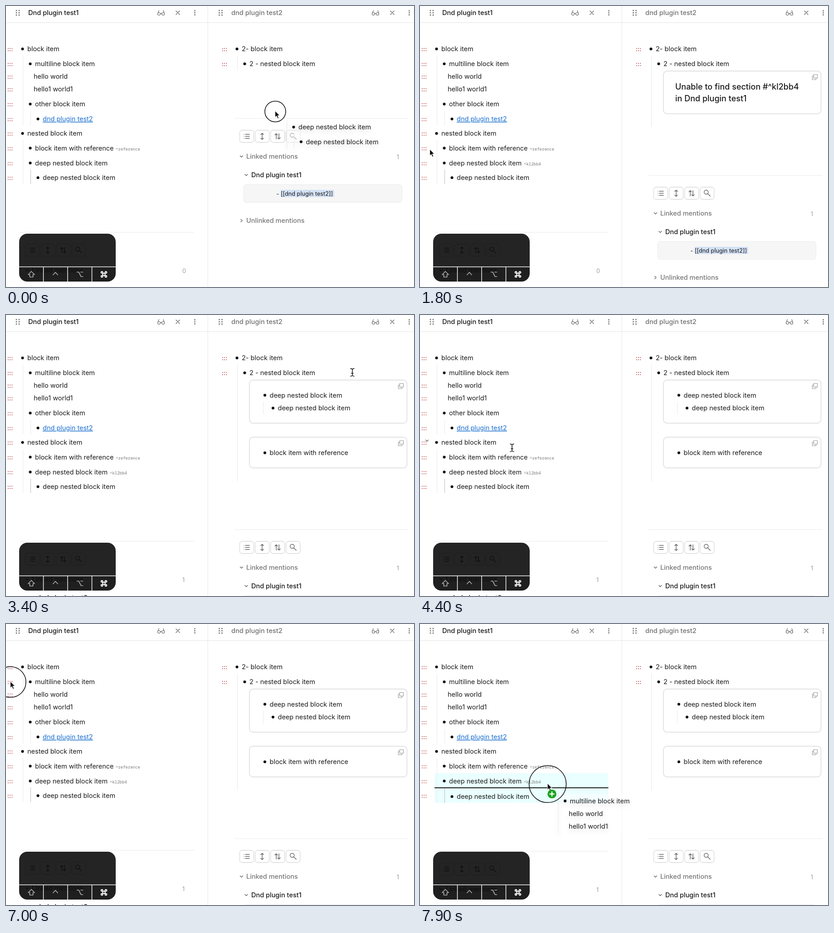
These frames come from a looping animation (900x622 px, 8 s). An HTML page:

```html
<!DOCTYPE html>
<html lang="en">
<head>
<meta charset="utf-8">
<title>Block drag and drop</title>
<style>
html, body { margin: 0; width: 100%; height: 100%; overflow: hidden; background: #fff; }
svg { display: block; width: 100%; height: 100%; }
text { font: 14.5px Inter, sans-serif; fill: #1a1a1a; white-space: pre; }
.title { font-size: 14.6px; font-weight: 500; }
.bold { font-weight: 500; }
.muted { font-weight: 500; fill: #777; }
.link { fill: #1a6fd0; text-decoration: underline; }
.count { font-size: 12.5px; fill: #999; }
.small { font-size: 12.7px; }
.error { font-size: 18px; font-weight: 500; }
.ref { font: 9px "Noto Sans Mono", monospace; fill: #777; }
.icon { fill: none; stroke: #666; stroke-width: 1.4; stroke-linecap: round; stroke-linejoin: round; }
.lift { filter: drop-shadow(0 5px 6px rgba(0, 0, 0, .16)); }
</style>
</head>
<body>
<svg id="stage" viewBox="0 0 900 622"></svg>
<script>
const LOOP = 8000, STEP = 100;

// time, x, y of the pointer
const PATH = [
  [0, 594, 233], [200, 648, 176], [400, 700, 126], [500, 712, 120], [700, 714, 122], [900, 716, 131],
  [1000, 716, 131], [1100, 690, 150], [1300, 460, 255], [1500, 160, 315], [1600, 70, 322], [1800, 22, 318],
  [2000, 9, 316], [2200, 10, 316], [2300, 60, 300], [2500, 400, 215], [2700, 650, 176], [2800, 735, 138],
  [2900, 767, 130], [3000, 767, 125], [3300, 764, 127], [3600, 764, 127], [3700, 650, 150], [3800, 420, 225],
  [3900, 250, 282], [4000, 203, 293], [4300, 203, 293], [4400, 203, 294], [6000, 203, 294],
  [6400, 80, 190], [6700, 12, 132], [6800, 10, 128], [7100, 10, 128], [7200, 13, 134], [7300, 249, 334], [8000, 287, 357]
];
// time, radius of the press ring
const RING = [
  [0, 23], [100, 41], [600, 41], [700, 23], [800, 0], [1900, 0], [2000, 18], [2100, 34], [2200, 41],
  [3100, 41], [3200, 23], [3300, 0], [6800, 0], [6900, 18], [7000, 34], [7100, 34], [7200, 41], [8000, 41]
];
// time, offset of the dragged text from the pointer
const LAG = [[0, 51, 35], [600, 49, 38], [2700, 42, 38], [2900, 24, 38], [3100, 49, 38], [7300, 45, 35], [7900, 49, 38]];

const DROPS = [
  { from: 300, to: 700, x: 504, top: 111, line: 144, bottom: 143 },
  { from: 2800, to: 3200, x: 504, top: 111, line: 270, bottom: 269 },
  { from: 7300, to: 7600, x: 32, top: 297, line: 330, bottom: 329 },
  { from: 7600, to: 8000, x: 32, top: 330, line: 362.5, bottom: 396 }
];

const ROWS = [
  [47, 95, 'block item'], [64, 128, 'multiline block item'], [61, 156, 'hello world'],
  [61, 184, 'hello1 world1'], [64, 217, 'other block item'], [81, 250, 'dnd plugin test2'],
  [47, 282, 'nested block item'], [64, 314.5, 'block item with reference'],
  [64, 347.5, 'deep nested block item'], [81, 380, 'deep nested block item']
];

const within = (t, a, b) => t >= a && t < b;

function sample(keys, t) {
  const i = keys.findIndex(k => k[0] > t);
  if (i < 0) return keys[keys.length - 1].slice(1);
  if (i === 0) return keys[0].slice(1);
  const a = keys[i - 1], b = keys[i], p = (t - a[0]) / (b[0] - a[0]);
  return a.slice(1).map((v, j) => v + (b[j + 1] - v) * p);
}

const text = (x, y, s, cls = '') => `<text x="${x}" y="${y + 5.2}" class="${cls}">${s}</text>`;
const dot = (x, y, r, fill = '#111') => `<circle cx="${x}" cy="${y}" r="${r}" fill="${fill}"/>`;
const rect = (x, y, w, h, attrs) => `<rect x="${x}" y="${y}" width="${w}" height="${h}" ${attrs}/>`;
const icon = (x, y, d, attrs = '') => `<path class="icon" transform="translate(${x} ${y})" d="${d}" ${attrs}/>`;
const guide = (x, y1, y2, color = '#e9e9e9') => rect(x - .5, y1, 1, y2 - y1, `fill="${color}"`);
const item = (x, y, s, cls) => dot(x - 10.5, y, 3.1) + text(x, y, s, cls);
const dots = (xs, ys, r, fill) => xs.map(x => ys.map(y => dot(x, y, r, fill)).join('')).join('');
const handle = (x, y) => dots([x - 4.2, x, x + 4.2], [y - 2, y + 3], .95, '#b8383a');
const chevron = (x, y, right) => icon(x, y, right ? 'M-1.5-3L1.5 0L-1.5 3' : 'M-3-1.5L0 1.5L3-1.5');

function header(x, title, fill) {
  return dots([x + 23, x + 29], [10, 15, 20], 1.6, '#777')
    + `<text x="${x + (x ? 24 : 49)}" y="20.4" class="title" style="fill:${fill}">${title}</text>`;
}

function headerIcons(x) {
  return icon(x + 342, 15, 'M-7.5 2.5a3 3 0 1 0 6 0a3 3 0 1 0-6 0M1.5 2.5a3 3 0 1 0 6 0a3 3 0 1 0-6 0M-1.5 2Q0 .8 1.5 2M-7.5 2L-4.5-5M7.5 2L5-5',
      'style="stroke-width:1.2"')
    + icon(x + 379, 15, 'M-4-4L4 4M4-4L-4 4')
    + dots([x + 416.5], [10.5, 15, 19.5], 1.5, '#777');
}

const TOOLS = [
  'M-6-4.5h0M-6 0h0M-6 4.5h0M-3-4.5H6M-3 0H6M-3 4.5H6',
  'M0-7V7M-3.2-4L0-7L3.2-4M-3.2 4L0 7L3.2 4',
  'M-3 6V-6M-6-3L-3-6L0-3M3-6V6M0 3L3 6L6 3',
  'M-6.5-2.5a4.5 4.5 0 1 0 9 0a4.5 4.5 0 1 0-9 0M1.5 1L7 6.5'
];

function mentions(x, y, count, child) {
  let out = rect(x, y - .5, 384, 1, 'fill="#e9e9e9"');
  TOOLS.forEach((d, i) => {
    const left = x + 11.5 + i * 34.1;
    out += rect(left, y + 26, 31, 27, 'rx="5.5" fill="#fff" stroke="#d9d9d9" stroke-width="1.3"')
      + icon(left + 15.5, y + 39.5, d);
  });
  out += chevron(x + 15.5, y + 84) + text(x + 26, y + 84, 'Linked mentions', 'muted')
    + text(x + 358, y + 84.5, count, 'count');
  if (child) {
    out += chevron(x + 26, y + 125) + text(x + 37, y + 125, child, 'bold')
      + rect(x + 20, y + 146, 349.5, 40, 'rx="6" fill="#f6f6f6" stroke="#ececec"')
      + rect(x + 102, y + 158, 118, 16, 'fill="#d3e1f5"')
      + text(x + 92.5, y + 165.5, '- [[dnd plugin test2]]', 'small')
      + chevron(x + 15.5, y + 226, true) + text(x + 26, y + 226, 'Unlinked mentions', 'muted');
  }
  return out;
}

function embed(y, h, content) {
  return rect(537, y, 347.5, h, 'rx="8" fill="none" stroke="#e2e2e2" stroke-width="1.8"')
    + icon(871, y + 13.5, 'M-2.5-6H5.5V2H-2.5ZM-2.5-2.5H-5.5V5.5H2.5V2', 'style="stroke:#999;stroke-width:1.2"') + content;
}

function leftPane(t, drop) {
  const line = drop && drop.x < 400 ? drop.line : Infinity;
  const down = y => y > line ? 2 : 0;
  let out = guide(37.5, 110, 264) + guide(54.5, 233, 264)
    + guide(37.5, 297, 394 + down(390)) + guide(54.5, 362 + down(370), 394 + down(390), '#bdbdbd');
  ROWS.forEach(([x, y, s], i) => {
    const draw = x === 61 ? text : item;
    out += handle(9, y + 1) + draw(x, y + down(y), s, i === 5 ? 'link' : '');
  });
  out += text(242, 315, '^reference', 'ref');
  if (t >= 800) out += text(229, 348 + down(348), '^kl2bb4', 'ref');
  if (within(t, 3900, 6100)) out += chevron(15.5, 278);
  const linked = t >= 2000;
  return out + mentions(31, 501 + down(501), linked ? '1' : '0', linked && 'dnd plugin test2');
}

function rightPane(t, drop) {
  const found = t >= 2000, second = t >= 3200;
  let bottom = 143, base = 249, out = '';
  if (t >= 800) {
    bottom = 267;
    base = found ? 376 : 375;
    out += embed(144, found ? 95.5 : 94.5, found
      ? guide(567.5, 192, 220) + item(581.5, 177.5, 'deep nested block item') + item(599.5, 206, 'deep nested block item')
      : text(563, 179.5, 'Unable to find section #^kl2bb4', 'error') + text(563, 205.5, 'in Dnd plugin test1', 'error'));
  }
  if (second) {
    bottom = 368;
    base = 475;
    out += embed(270.5, 68, item(581.5, 305, 'block item with reference'));
  }
  if (drop && drop.x > 400) base += 2;
  return guide(510.5, 110, bottom) + handle(482, 96) + handle(482, 129)
    + item(520, 95, '2- block item') + item(537, 128, '2 - nested block item')
    + out + mentions(504, base, '1', 'Dnd plugin test1');
}

const dropMark = d => rect(d.x, d.top, 383.5, d.bottom - d.top, 'fill="#eaffff"');
const dropLine = d => rect(d.x, d.line - 1, 383.5, 2, 'fill="#111"');

function ghost(t, x, y) {
  let body, h, w = 206;
  if (t < 600) {
    h = 64;
    body = guide(-25.5, -16, 48) + guide(-9.5, 16, 48)
      + item(0, 0, 'deep nested block item') + item(16.5, 32.5, 'deep nested block item');
  } else if (within(t, 2200, 3100)) {
    h = 33;
    body = guide(-25.5, -16, 16) + item(0, 0, 'block item with reference') + text(178, .5, '^reference', 'ref');
    w = 260;
  } else if (t >= 7200) {
    h = 88;
    w = 160;
    body = guide(-25.5, -16, 72) + item(0, 0, 'multiline block item')
      + text(-2.5, 28, 'hello world') + text(-2.5, 56.5, 'hello1 world1');
  } else return '';
  return `<g transform="translate(${x} ${y})">${rect(-26, -16, w, h, 'fill="#fff" opacity=".5"')}<g class="lift">${body}</g></g>`;
}

function pointer(t, x, y, plus) {
  if (within(t, 800, 1200) || within(t, 3300, 6300)) {
    const beam = 'M-4-8.5Q-1-8.5 0-6.5Q1-8.5 4-8.5M0-6.5V6.5M-4 8.5Q-1 8.5 0 6.5Q1 8.5 4 8.5M-2 2H2';
    return icon(x, y, beam, 'style="stroke:#fff;stroke-width:3"') + icon(x, y, beam, 'style="stroke:#111;stroke-width:1.5"');
  }
  const arrow = `<path transform="translate(${x - .5} ${y - 1})" d="M0 0V14.5L3.3 11.4L5.7 17L8.2 15.9L5.8 10.5H10.3Z" fill="#111" stroke="#fff" stroke-width="1"/>`;
  const badge = dot(x + 9.5, y + 22.5, 9.8, '#1ca31f')
    + icon(x + 9.5, y + 22.5, 'M-4.5 0H4.5M0-4.5V4.5', 'style="stroke:#fff;stroke-width:2.4"');
  return arrow + (plus ? badge : '');
}

function keys() {
  const gray = 'style="stroke:#aaa;stroke-width:1.7"';
  return '<path d="M29 577V522a18 18 0 0 1 18-18H224a18 18 0 0 1 18 18V577Z" fill="#000" opacity=".86"/>'
    + '<path d="M29 577H242V592a18 18 0 0 1-18 18H47a18 18 0 0 1-18-18Z" fill="#000" opacity=".88"/>'
    + rect(29, 576.7, 213, 1.4, 'fill="#fff"')
    + [82.5, 136, 189.5].map(x => rect(x - .7, 577, 1.4, 33, 'fill="#fff"')).join('')
    + icon(56, 594, 'M0-6.5L7 .5H3.5V6H-3.5V.5H-7Z', gray)
    + icon(109, 592, 'M-5 3L0-2.5L5 3', gray)
    + icon(163, 594, 'M-6.5-5H-2.5L2.5 5H6.5M2-5H6.5', gray)
    + icon(216, 594, 'M-2.5-2.5H2.5V2.5H-2.5ZM-2.5-2.5H-4.3A1.9 1.9 0 1 1-2.5-4.3ZM2.5-2.5V-4.3A1.9 1.9 0 1 1 4.3-2.5ZM2.5 2.5H4.3A1.9 1.9 0 1 1 2.5 4.3ZM-2.5 2.5V4.3A1.9 1.9 0 1 1-4.3 2.5Z',
      'style="stroke:#fff;stroke-width:2"');
}

const CHROME = rect(0, 36, 900, 1.5, 'fill="#ebebeb"') + rect(444.5, 0, 1.2, 622, 'fill="#ebebeb"')
  + header(0, 'Dnd plugin test1', '#1a1a1a') + dots([470.5, 476.5], [10, 15, 20], 1.6, '#777')
  + '<text x="497" y="20.4" class="title" style="fill:#707070">dnd plugin test2</text>'
  + headerIcons(0) + headerIcons(473);

function scene(t) {
  const [x, y] = sample(PATH, t), [radius] = sample(RING, t), [dx, dy] = sample(LAG, t);
  const drop = DROPS.find(d => within(t, d.from, d.to));
  return (drop ? dropMark(drop) : '') + CHROME + leftPane(t, drop) + rightPane(t, drop)
    + (drop ? dropLine(drop) : '') + keys() + ghost(t, x + dx, y + dy)
    + (radius ? `<circle cx="${x}" cy="${y + .5}" r="${radius}" fill="none" stroke="#111" stroke-width="1.6"/>` : '')
    + pointer(t, x, y, drop);
}

const stage = document.getElementById('stage');
const start = performance.now();
let shown = -1;

function tick() {
  const t = Math.floor(((performance.now() - start) % LOOP) / STEP) * STEP;
  if (t !== shown) {
    shown = t;
    stage.innerHTML = scene(t);
  }
  requestAnimationFrame(tick);
}
tick();
</script>
</body>
</html>
```
